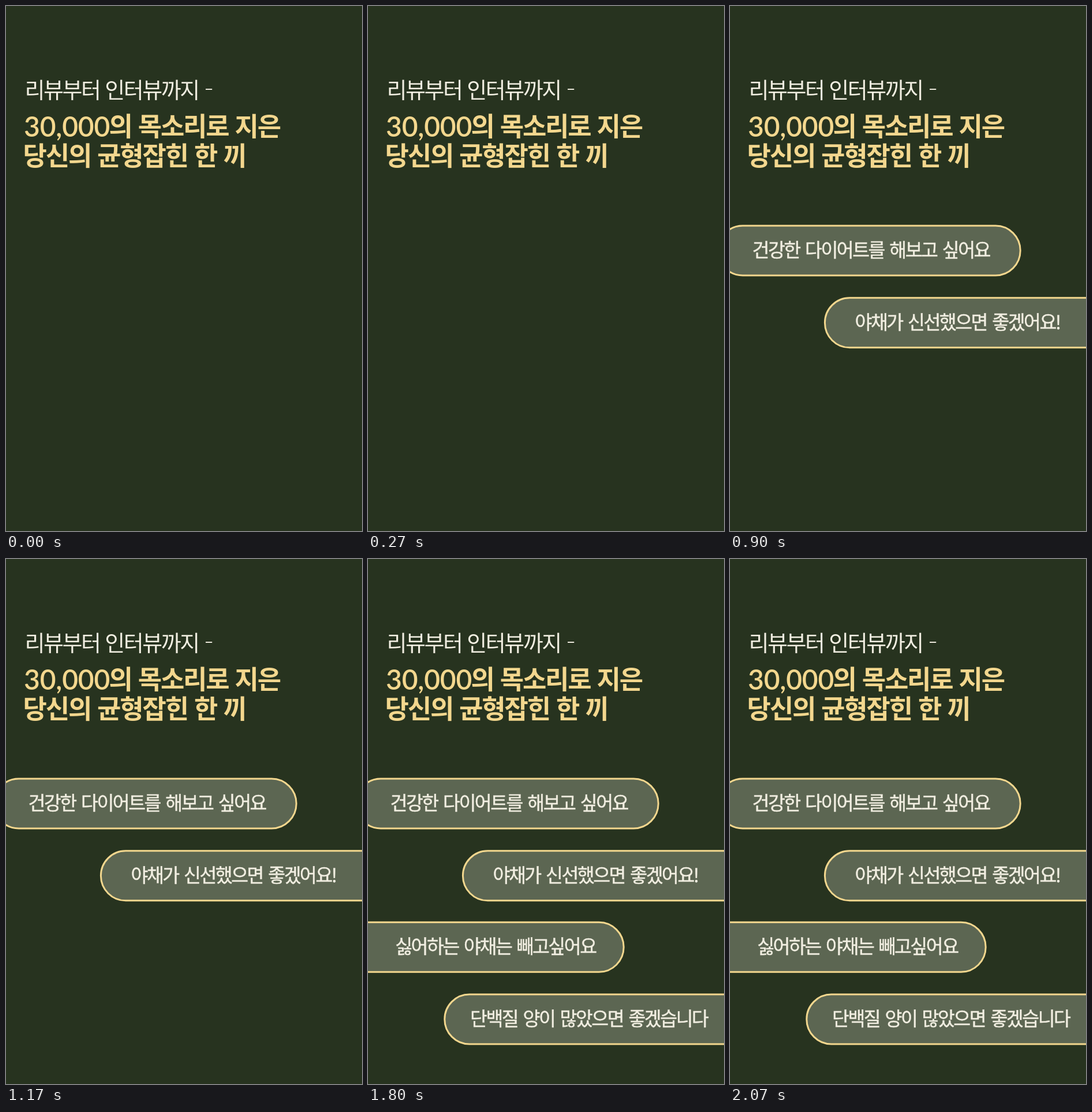
These frames come from a looping animation (617 px wide and 908 px high, 2.25 s). An HTML page with a canvas:

```html
<!DOCTYPE html>
<html lang="ko">
<head>
<meta charset="utf-8">
<title>당신의 균형잡힌 한 끼</title>
<style>
  html, body { margin: 0; width: 100%; height: 100%; overflow: hidden; background: #27331f; }
  canvas { display: block; width: 617px; height: 908px; }
</style>
</head>
<body>
<canvas id="stage"></canvas>
<script>
const W = 617, H = 908, STEP = 450, STEPS = 5;
const BG = '#27331f', GOLD = '#f3d78e', CREAM = '#f1eee1', FILL = '#5c6652';
const HANGUL = '"Noto Sans CJK KR", "Noto Sans CJK", "Noto Sans KR", sans-serif';
const LATIN = 'Lato, sans-serif';

const canvas = document.getElementById('stage');
const ctx = canvas.getContext('2d');
const ratio = window.devicePixelRatio || 1;
canvas.width = Math.round(W * ratio);
canvas.height = Math.round(H * ratio);
ctx.scale(ratio, ratio);

// left and right are the ends of the outline; some lie off stage
const pills = [
  { left: -21, right: 503.2, y: 423, x: 38.5, text: '건강한 다이어트를 해보고 싶어요' },
  { left: 164.4, right: 700, y: 547.8, x: 216.5, text: '야채가 신선했으면 좋겠어요!' },
  { left: -90, right: 443.2, y: 671.3, x: 47.2, text: '싫어하는 야채는 빼고싶어요' },
  { left: 132.8, right: 700, y: 796, x: 177, text: '단백질 양이 많았으면 좋겠습니다' }
];

// weight is an extra outline that thickens the strokes
const styles = {
  lead: { font: `400 38px ${HANGUL}`, color: CREAM, letter: -2.5, word: 3, weight: 0 },
  dash: { font: `300 48px ${LATIN}`, color: CREAM, letter: 0, word: 0, weight: 0 },
  title: { font: `700 45px ${HANGUL}`, color: GOLD, letter: -2.2, word: 3, weight: 0 },
  number: { font: `600 48px ${LATIN}`, color: GOLD, letter: -0.2, word: 0, weight: 0 },
  quote: { font: `400 32.5px ${HANGUL}`, color: CREAM, letter: -2.5, word: 4.5, weight: 0.5 }
};

function write(text, x, y, style) {
  ctx.font = style.font;
  ctx.fillStyle = ctx.strokeStyle = style.color;
  ctx.letterSpacing = style.letter + 'px';
  ctx.wordSpacing = style.word + 'px';
  ctx.fillText(text, x, y);
  if (style.weight) {
    ctx.lineWidth = style.weight;
    ctx.strokeText(text, x, y);
  }
}

function drawPill({ left, right, y, x, text }) {
  const r = 43;
  ctx.beginPath();
  ctx.roundRect(left, y - r, right - left, 2 * r, r);
  ctx.fillStyle = FILL;
  ctx.fill();
  ctx.strokeStyle = GOLD;
  ctx.lineWidth = 3;
  ctx.stroke();
  write(text, x, y + 11, styles.quote);
}

function draw(time) {
  const shown = Math.floor(time / STEP) % STEPS;
  ctx.fillStyle = BG;
  ctx.fillRect(0, 0, W, H);
  write('리뷰부터 인터뷰까지', 32.5, 158.6, styles.lead);
  write('-', 342.7, 158, styles.dash);
  write('30,000', 31, 226, styles.number);
  write('의 목소리로 지은', 178.5, 225.2, styles.title);
  write('당신의 균형잡힌 한 끼', 29.5, 276.2, styles.title);
  pills.slice(0, shown).forEach(drawPill);
}

const start = performance.now();
function tick() {
  draw(performance.now() - start);
  requestAnimationFrame(tick);
}
tick();
</script>
</body>
</html>
```
